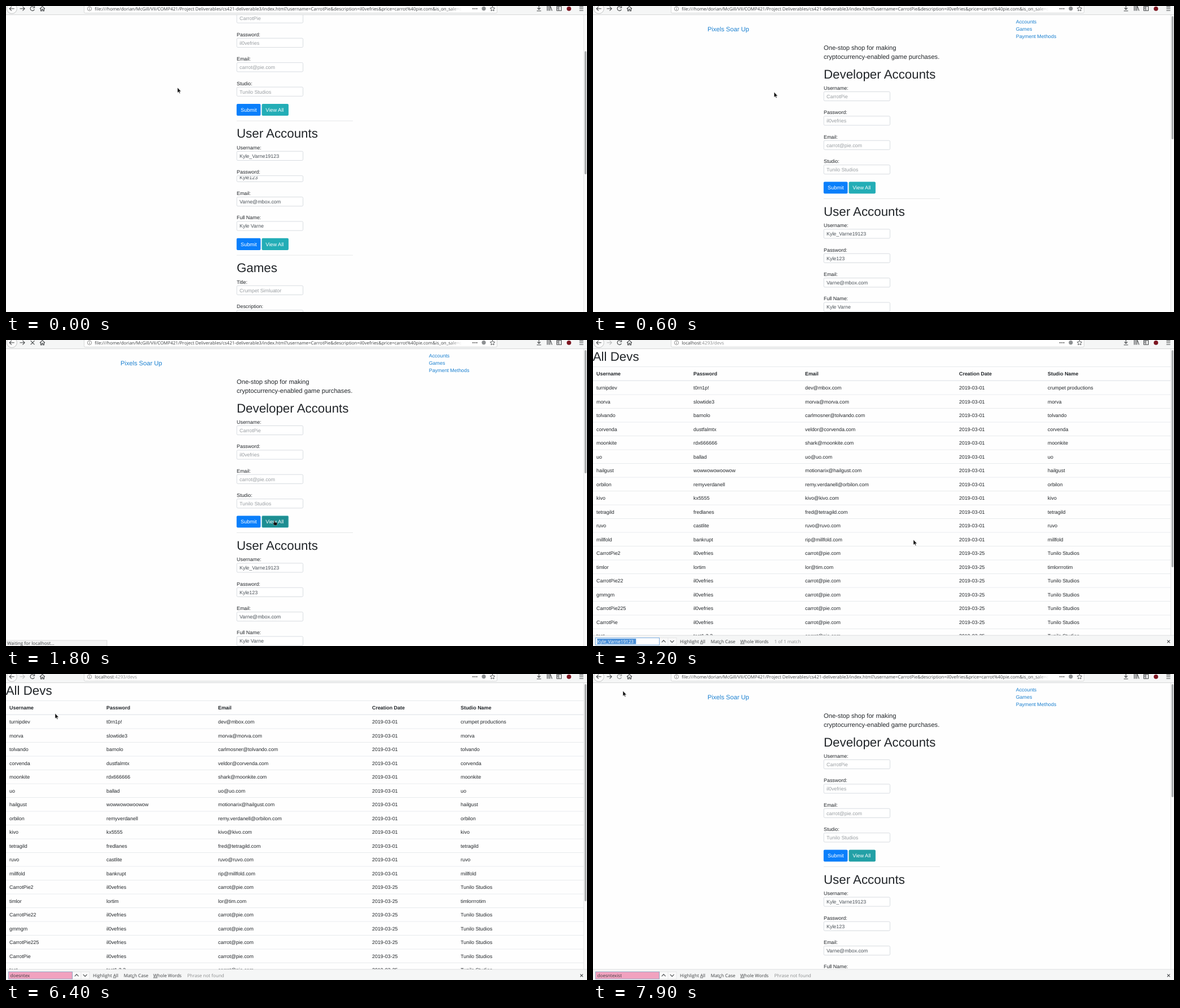
Write an HTML page that moves like this. It is 1030 px wide and 544 px high and loops after 8 s.

```html
<!DOCTYPE html>
<html lang="en">
<head>
<meta charset="utf-8">
<title>Store admin walkthrough</title>
<style>
html, body { margin: 0; width: 100%; height: 100%; overflow: hidden; background: #fefefe; }
svg { display: block; width: 1030px; height: 544px; }
text { font: 8.92px "Liberation Sans", Arial, sans-serif; fill: #212529; text-rendering: geometricPrecision; white-space: pre; }
.h1 { font-size: 22.32px; }
.lead { font-size: 11.16px; }
.link { fill: #1b80d0; }
.bold { font-weight: bold; }
.hint { fill: #989da1; }
.value { fill: #495057; }
.button { fill: #fff; font-size: 9.2px; }
.ui text, text.ui { font: 8.1px "Open Sans", "Noto Sans", sans-serif; fill: #3c3f40; }
.ui .dim { fill: #8b8d8e; }
.ui .url { font-size: 7.94px; }
.key { text-decoration: underline; }
.icon { fill: none; stroke: #45484a; stroke-width: 1.1; }
</style>
</head>
<body>
<svg id="stage" viewBox="0 0 1030 544" xmlns="http://www.w3.org/2000/svg"></svg>
<script>
const LOOP = 8000;
const FIELD_PITCH = 43.4, SECTION_PITCH = 244.4, ROW_PITCH = 24.5;
const TEAR_Y = 303;

const text = (x, y, content, cls = '') => `<text x="${x}" y="${y}" class="${cls}">${content}</text>`;
const rect = (x, y, w, h, fill, extra = '') =>
  `<rect x="${x}" y="${y}" width="${w}" height="${h}" fill="${fill}" ${extra}/>`;
const path = (d, extra = '') => `<path d="${d}" ${extra}/>`;

function section(index, title, fields, cls) {
  const top = index * SECTION_PITCH;
  const inputs = fields.map(([label, value], i) => {
    const y = top + i * FIELD_PITCH;
    return text(409, y + 148.8, label + ':') +
      rect(409.2, y + 152.4, 117.3, 16.2, '#fff', 'rx="1.8" stroke="#ced4da" stroke-width=".8"') +
      text(414, y + 163.8, value, cls);
  }).join('');
  const viewId = index === 0 ? 'id="viewAll"' : '';
  return text(409, top + 128.5, title, 'h1') + inputs +
    rect(408.8, top + 312.4, 42.6, 21.1, '#0a7ffb', 'rx="2"') + text(416, top + 326.3, 'Submit', 'button') +
    rect(453.5, top + 312.4, 47.4, 21.1, '#23adb6', 'rx="2" ' + viewId) + text(460.3, top + 326.3, 'View All', 'button') +
    rect(409, top + 342.3, 206, .7, '#dcdedf');
}

const formPage =
  text(203, 45, 'Pixels Soar Up', 'lead link') +
  ['Accounts', 'Games', 'Payment Methods'].map((s, i) => text(749.7, 30.8 + i * 13.3, s, 'link')).join('') +
  text(409, 77.5, 'One-stop shop for making', 'lead') +
  text(409, 94.2, 'cryptocurrency-enabled game purchases.', 'lead') +
  section(0, 'Developer Accounts', [['Username', 'CarrotPie'], ['Password', 'il0vefries'],
    ['Email', 'carrot@pie.com'], ['Studio', 'Tunilo Studios']], 'hint') +
  section(1, 'User Accounts', [['Username', 'Kyle_Varne19123'], ['Password', 'Kyle123'],
    ['Email', 'Varne@mbox.com'], ['Full Name', 'Kyle Varne']], 'value') +
  section(2, 'Games', [['Title', 'Crumpet Simluator'], ['Description', '']], 'hint');

const fry = (name, password = 'il0vefries') => `${name}|${password}|carrot@pie.com|Tunilo Studios`;
const devs = [
  'turnipdev|t0rn1p!|dev@mbox.com|crumpet productions',
  'morva|slowtide3|morva@morva.com|morva',
  'tolvando|barnolo|carlmosner@tolvando.com|tolvando',
  'corvenda|dustfalmtx|veldor@corvenda.com|corvenda',
  'moonkite|rdx666666|shark@moonkite.com|moonkite',
  'uo|ballad|uo@uo.com|uo',
  'hailgust|wowwowowoowow|motionarix@hailgust.com|hailgust',
  'orbilon|remyverdanell|remy.verdanell@orbilon.com|orbilon',
  'kivo|kx5555|kivo@kivo.com|kivo',
  'tetragild|fredlanes|fred@tetragild.com|tetragild',
  'ruvo|castlite|ruvo@ruvo.com|ruvo',
  'millfold|bankrupt|rip@millfold.com|millfold',
  fry('CarrotPie2'),
  'timlor|lortim|lor@tim.com|timlorrrotim',
  fry('CarrotPie22'), fry('gmmgm'), fry('CarrotPie225'), fry('CarrotPie'), fry('test', 'test1.2.3')
];
const columns = [6, 178, 376, 649, 806];
const cells = (values, y, cls) => values.map((v, i) => text(columns[i], y, v, cls)).join('');

const devsPage =
  text(-.3, 37, 'All Devs', 'h1') + rect(0, 47.2, 1024, .7, '#dee2e6') +
  cells(['Username', 'Password', 'Email', 'Creation Date', 'Studio Name'], 63, 'bold') +
  rect(0, 71.7, 1024, 1.1, '#dee2e6') +
  devs.map((row, i) => {
    const [name, password, mail, studio] = row.split('|');
    const y = 88.1 + i * ROW_PITCH;
    return cells([name, password, mail, i < 12 ? '2019-03-01' : '2019-03-25', studio], y) +
      rect(0, y + 8.6, 1024, .7, '#dee2e6');
  }).join('') +
  `<g id="match">${rect(31.8, 129, 10.4, 10.4, '#38d878')}${text(32, 137.1, 'do', 'button')}</g>`;

const toolbar = `<g class="ui">
  ${rect(0, 0, 1030, 15.5, '#f5f6f6')}${rect(0, 15, 1030, .8, '#cfd0d1')}
  ${rect(138.5, -5, 732, 17.6, '#fff', 'rx="2" stroke="#cdcecf" stroke-width=".8"')}
  <circle cx="10.4" cy="4.6" r="9" fill="#fcfcfc" stroke="#b5b6b7" stroke-width=".8"/>
  <g class="icon">
    ${path('M14.8 4.7H6.3M9.8 1.1L6.2 4.7L9.8 8.3')}
    ${path('M24.5 4.7H33M29.5 1.1L33.1 4.7L29.5 8.3', 'id="forward"')}
    ${path('M50.4 6A3.8 3.8 0 1 1 49.4 1.7M50.6 .2V3.3H47.4', 'id="reload"')}
    ${path('M43.7 1.3L50.5 8.1M50.5 1.3L43.7 8.1', 'id="stop"')}
    ${path('M60 5L64.5 .7L69 5M61.5 4.6V8.6H63.5V5.8H65.5V8.6H67.5V4.6')}
    <circle cx="148" cy="4.9" r="3.7" stroke="#777" stroke-width=".8"/>${path('M148 4.4V7M148 2.6V3.5', 'stroke="#777"')}
    ${path('M862.5 .5L863.8 3.3L866.7 3.7L864.6 5.8L865.1 8.8L862.5 7.4L859.9 8.8L860.4 5.8L858.3 3.7L861.2 3.3Z', 'stroke-width=".9"')}
    ${path('M944.8 0V6M942 3.4L944.8 6.2L947.6 3.4M941 8.8H948.6')}
    ${path('M959.5 0V8.5M962 0V8.5M964.3 0V8.5M965.3 .8L968 8.5')}
    ${path('M976.5 .8H984.5V8.3H976.5ZM980 .8V8.3M977.5 3H979M977.5 5H979')}
    ${path('M1016.5 1.6H1023.5M1016.5 4.8H1023.5M1016.5 8H1023.5')}
  </g>
  <g fill="#555"><circle cx="828" cy="4.8" r="1.1"/><circle cx="831.3" cy="4.8" r="1.1"/><circle cx="834.6" cy="4.8" r="1.1"/></g>
  <circle cx="847" cy="4.6" r="3.6" fill="#8d9092"/>
  <circle cx="998" cy="4.8" r="3.9" fill="#7c1520"/>
  <g id="fileUrl" clip-path="url(#urlClip)">
    ${text(157.3, 7.7, 'file:///home/dorian/McGill/VII/COMP421/Project Deliverables/cs421-deliverable3/index.html?username=CarrotPie&amp;description=il0vefries&amp;price=carrot%40pie.com&amp;is_on_sale=on', 'url')}
    ${rect(784, 0, 24, 11.5, 'url(#urlFade)')}
  </g>
  <g id="hostUrl">${text(157.3, 7.7, 'localhost<tspan class="dim">:4293/devs</tspan>')}</g>
</g>`;

const findBar = `<g id="findBar" class="ui">
  ${rect(0, 525, 1030, 19, '#f5f6f6')}${rect(0, 524.7, 1030, .7, '#d2d3d4')}
  ${rect(118, 529.4, 30, 13, '#fafafa', 'stroke="#dadbdc" stroke-width=".6"')}${rect(132.7, 529.4, .6, 13, '#dadbdc')}
  ${rect(4.4, 529.4, 113.2, 12.8, '#fff', 'id="findField" stroke-width=".9"')}
  ${rect(7.3, 531, 69, 9.6, '#4a90d9', 'id="selection"')}
  <text id="query" x="7.6" y="538.6"></text>
  <g class="icon">${path('M121.8 537.3L125.2 533.9L128.6 537.3M136.8 534.2L140.2 537.6L143.6 534.2')}
    ${path('M1018 533.6L1022.8 538.4M1022.8 533.6L1018 538.4')}</g>
  ${text(154, 538.6, 'Highlight <tspan class="key">A</tspan>ll')}
  ${text(208.7, 538.6, 'Mat<tspan class="key">c</tspan>h Case')}
  ${text(261, 538.6, '<tspan class="key">W</tspan>hole Words')}
  <text id="result" x="321.5" y="538.6" class="dim"></text>
</g>`;

const stage = document.getElementById('stage');
stage.innerHTML = `<defs>
  <linearGradient id="urlFade"><stop offset="0" stop-color="#fff" stop-opacity="0"/><stop offset="1" stop-color="#fff"/></linearGradient>
  <clipPath id="urlClip">${rect(157, 0, 651, 12, '#000')}</clipPath>
  <clipPath id="upperClip">${rect(0, 16, 1030, TEAR_Y - 16, '#000')}</clipPath>
  <clipPath id="lowerClip">${rect(0, TEAR_Y, 1030, 544 - TEAR_Y, '#000')}</clipPath>
  <g id="formContent">${formPage}</g>
</defs>
${rect(0, 0, 1030, 544, '#fefefe')}
<g id="form">
  <g clip-path="url(#upperClip)"><use id="upper" href="#formContent"/></g>
  <g clip-path="url(#lowerClip)"><use id="lower" href="#formContent"/></g>
</g>
<g id="devs">${devsPage}</g>
${rect(1024, 16, 6, 528, '#fbfbfb')}${rect(1023.8, 16, .7, 528, '#dcdcdc')}
${rect(1025.7, 18, 3.4, 219, '#a9abac', 'id="thumb" rx="1.7"')}
${toolbar}${findBar}
<g id="status">${rect(-1, 534, 180, 11, '#f4f4f4', 'stroke="#cfcfcf" stroke-width=".7"')}
  <text id="statusText" class="ui" x="2" y="542.3"></text></g>
${path('M0 0V9.3L2.1 7.4L3.6 10.5L5 9.9L3.6 6.9H6.4Z', 'id="arrow" fill="#111" stroke="#fff" stroke-width=".5"')}
${path('M0 0Q1-.9 1.8 0V3L5 3.6Q6 4 5.8 5.2L5 8.6H.8L-1.8 5.2Q-2 4 0 4.6Z', 'id="hand" fill="#111" stroke="#fff" stroke-width=".3"')}`;

const el = Object.fromEntries([...stage.querySelectorAll('[id]')].map(node => [node.id, node]));
const set = (id, attrs) => Object.entries(attrs).forEach(([k, v]) => el[id].setAttribute(k, v));
const show = (id, visible) => { el[id].style.display = visible ? '' : 'none'; };
const setText = (id, value) => { if (el[id].textContent !== value) el[id].textContent = value; };

// Each track holds its value from the given time until the next entry.
const at = (track, t) => track.findLast(([start]) => t >= start);
const scrolls = [[0, 144], [100, 112], [300, 62], [400, 18], [600, 0]];
const pointer = [
  [0, 304, 145], [400, 312, 149], [600, 321, 153], [700, 328, 160], [800, 338, 171],
  [1000, 378, 215], [1100, 425, 267], [1200, 460, 306], [1300, 475, 321],
  [2400, 490, 328], [2500, 525, 342], [2600, 558, 353], [2700, 568, 355],
  [5100, 236, 103], [5200, 235, 101], [5400, 190, 78], [5500, 126, 48], [5600, 68, 26], [5700, 28, 13], [5800, 14, 8],
  [6100, 10, 3], [6200, 58, 36], [6300, 98, 66], [6400, 87, 70], [7100, 85, 66], [7200, 82, 63],
  [7400, 52, 36], [7500, 20, 11], [7600, 11, 5], [7800, 28, 16], [7900, 53, 30]
];
const typed = [[0, 0], [3800, 2], [3900, 4], [4000, 5], [4200, 6], [5200, 7], [6300, 8], [6600, 10], [6700, 11]];
const viewColors = [[0, '#23adb6'], [1300, '#209da4'], [1500, '#1d8e92'], [7600, '#22a0a6']];

function render(t) {
  const onDevs = t >= 2400 && t < 7700;
  const finding = t >= 2700;
  const scroll = at(scrolls, t)[1];
  show('form', !onDevs);
  show('devs', onDevs);
  show('fileUrl', !onDevs);
  show('hostUrl', onDevs);
  set('upper', { y: t < 100 ? -138.5 : -scroll });
  set('lower', { y: -scroll });
  set('thumb', {
    y: 18 + scroll * .432,
    height: onDevs ? (finding ? 386 : 400) : (finding ? 201 : 219)
  });

  const pressed = t >= 1500 && t < 2400;
  set('viewAll', { fill: at(viewColors, t)[1], stroke: pressed ? '#8fd3d8' : 'none', 'stroke-width': 1 });
  show('status', pressed);
  setText('statusText', t < 1800 ? 'Looking up localhost…' : 'Waiting for localhost…');

  const stopping = t >= 1600 && t < 2400;
  const settling = (t >= 1500 && t < 3100) || t >= 7700;
  show('stop', stopping);
  show('reload', !stopping);
  set('reload', { opacity: settling ? .6 : 1 });
  set('forward', { opacity: onDevs ? .35 : 1 });

  const count = at(typed, t)[1];
  const missing = count > 2;
  show('findBar', finding);
  show('selection', count === 0);
  show('match', count === 2);
  setText('query', count ? 'doesntexist'.slice(0, count) : 'Kyle_Varne19123');
  el.query.style.fill = count ? '#3c3f40' : '#fff';
  setText('result', missing ? 'Phrase not found' : '1 of 1 match');
  set('findField', { fill: missing ? '#f1a2bf' : '#fff', stroke: missing ? '#8fa3c4' : '#69a3dc' });

  const [, x, y] = at(pointer, t);
  const overButton = t >= 1300 && t < 2400;
  show('arrow', !overButton);
  show('hand', overButton);
  set(overButton ? 'hand' : 'arrow', { transform: `translate(${x} ${y})` });
}

function tick(now) {
  render(now % LOOP);
  requestAnimationFrame(tick);
}
render(0);
requestAnimationFrame(tick);
</script>
</body>
</html>
```
